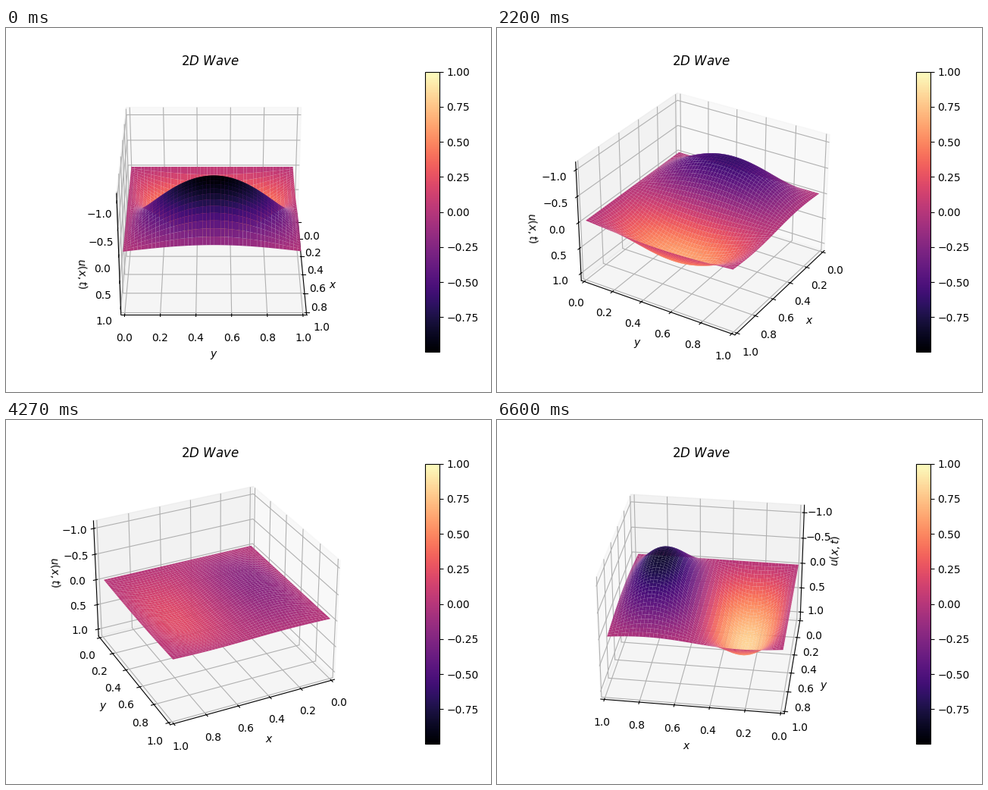
A matplotlib script that plays this animation: 640 by 480 pixels, repeating every 6670 ms.

```python
import numpy as np
import matplotlib.pyplot as plt
from matplotlib.animation import FuncAnimation

FRAMES, LOOP_MS = 100, 6670
N = 50                       # grid points per side
DT = 0.01                    # simulated time per frame
OMEGA = np.pi * np.sqrt(5)   # angular frequency of the (2, 1) mode
ELEV = 30
EDGE = 1 / 48                # margin around the unit square

side = np.arange(N) / N      # the far border is left open
X, Y = np.meshgrid(side, side, indexing="ij")
MODE = np.sin(2 * np.pi * X) * np.sin(np.pi * Y)


def wave(t):
    return MODE * np.cos(OMEGA * t)


def quads(a):
    """Corner values of every grid cell, going round the cell."""
    corners = (a[:-1, :-1], a[:-1, 1:], a[1:, 1:], a[1:, :-1])
    return np.stack([c.ravel() for c in corners], axis=1)


QX, QY = quads(X), quads(Y)

fig = plt.figure(figsize=(6.4, 4.8), dpi=100)
ax = fig.add_subplot(projection="3d")
surf = ax.plot_surface(X, Y, wave(0), rstride=1, cstride=1,
                       cmap="magma", vmin=MODE.min(), vmax=1)
fig.colorbar(surf, ax=ax, fraction=0.046, pad=0.2)

ax.set_title(r"$2D\ Wave$")
ax.set_xlabel("$x$")
ax.set_ylabel("$y$")
ax.set_zlabel("$u(x,t)$")
ax.set_xticks(np.linspace(0, 1, 6))
ax.set_yticks(np.linspace(0, 1, 6))
ax.set_zticks(np.linspace(-1, 1, 5))
ax.set_xlim(-EDGE, 1 + EDGE)
ax.set_ylim(-EDGE, 1 + EDGE)
top = 1.1 * (1 + 2 * EDGE)
ax.set_zlim(top, -top)       # u grows downwards


def update(i):
    qz = quads(wave(i * DT))
    surf.set_verts(np.stack([QX, QY, qz], axis=2))
    surf.set_array(qz.mean(axis=1))
    ax.view_init(elev=ELEV, azim=i)
    return (surf,)


anim = FuncAnimation(fig, update, frames=FRAMES, interval=LOOP_MS / FRAMES,
                     init_func=lambda: update(0), repeat=True, blit=False)
plt.show()
```
